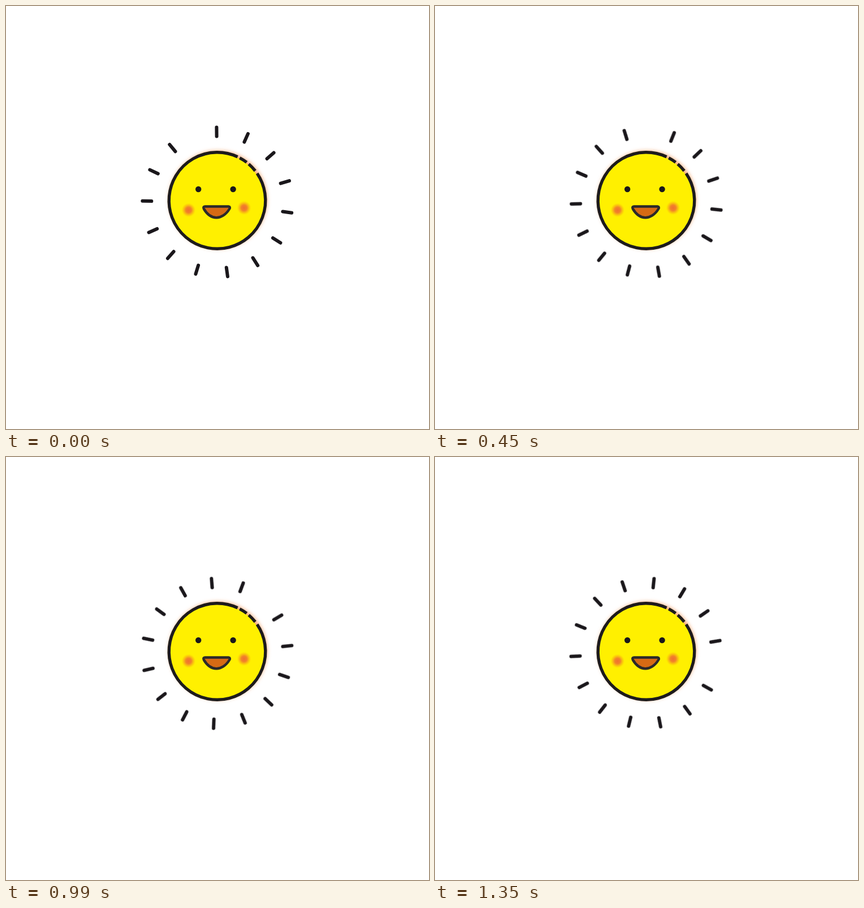
Animation, 748 px wide and 748 px high, one loop 1480 ms. Source, as an HTML page:

```html
<!DOCTYPE html>
<html lang="en">
<head>
<meta charset="utf-8">
<title>Sun</title>
<style>
  html, body { margin: 0; width: 100%; height: 100%; overflow: hidden; background: #fff; }
  svg { display: block; width: 100vw; height: 100vh; }
  #rays { transform-origin: 373.5px 346.7px; }
</style>
</head>
<body>
<svg viewBox="0 0 748 748">
  <defs>
    <filter id="halo" x="-20%" y="-20%" width="140%" height="140%">
      <feGaussianBlur stdDeviation="3.6"/>
    </filter>
    <filter id="soft" x="-10%" y="-10%" width="120%" height="120%">
      <feGaussianBlur stdDeviation=".6"/>
    </filter>
    <radialGradient id="blush">
      <stop offset="0" stop-color="#f0702f"/>
      <stop offset=".4" stop-color="#f0742f" stop-opacity=".88"/>
      <stop offset=".75" stop-color="#f58a20" stop-opacity=".35"/>
      <stop offset="1" stop-color="#ffb000" stop-opacity="0"/>
    </radialGradient>
  </defs>

  <g id="rays" stroke="#1a171b" stroke-width="6" stroke-linecap="round"></g>

  <circle cx="374.8" cy="342.7" r="86.5" fill="#f6a26c" filter="url(#halo)"/>
  <circle cx="373.5" cy="344" r="83.5" fill="#fff000"/>
  <g id="rim" fill="none" stroke="#1d1b1c" stroke-width="5.4" filter="url(#soft)"></g>

  <circle cx="322.8" cy="360.8" r="12.5" fill="url(#blush)"/>
  <circle cx="421" cy="357" r="12.5" fill="url(#blush)"/>
  <circle cx="340.2" cy="324" r="5.2" fill="#1a171b"/>
  <circle cx="401.6" cy="324" r="5.2" fill="#1a171b"/>
  <path d="M352 354.5H393.5Q397.3 355 395 359C389 369 380 374.2 372 374.2C364 374.2 356 369 350 359Q347.8 354.7 352 354.5Z"
        fill="#d66a14" stroke="#2b2929" stroke-width="4.5" stroke-linejoin="round"/>
</svg>
<script>
  const NS = 'http://www.w3.org/2000/svg';

  function addPath(parent, d) {
    const path = document.createElementNS(NS, 'path');
    path.setAttribute('d', d);
    parent.append(path);
  }

  // Point on a circle; angle in degrees, clockwise from the top.
  function polar(cx, cy, r, deg) {
    const a = deg * Math.PI / 180;
    return `${(cx + r * Math.sin(a)).toFixed(2)} ${(cy - r * Math.cos(a)).toFixed(2)}`;
  }

  const rays = document.getElementById('rays');
  for (let i = 0; i < 14; i++) {
    const deg = -0.65 + i * 24.69;
    addPath(rays, `M${polar(373.9, 347, 116.6, deg)}L${polar(373.9, 347, 132.6, deg)}`);
  }

  const rim = document.getElementById('rim');
  for (const [from, to] of [[55.8, 385], [27.8, 37.6], [40.8, 52]]) {
    const large = to - from > 180 ? 1 : 0;
    addPath(rim, `M${polar(373.5, 344, 85.3, from)}A85.3 85.3 0 ${large} 1 ${polar(373.5, 344, 85.3, to)}`);
  }

  // Slow turn, then a faster one, then a short rest; one step every 30 ms.
  const LOOP = 1480;
  rays.animate([
    { offset: 0, transform: 'rotate(0deg)', easing: 'steps(30)' },
    { offset: 900 / LOOP, transform: 'rotate(45deg)', easing: 'steps(15)' },
    { offset: 1350 / LOOP, transform: 'rotate(120deg)' },
    { offset: 1, transform: 'rotate(120deg)' }
  ], { duration: LOOP, iterations: Infinity });
</script>
</body>
</html>
```
